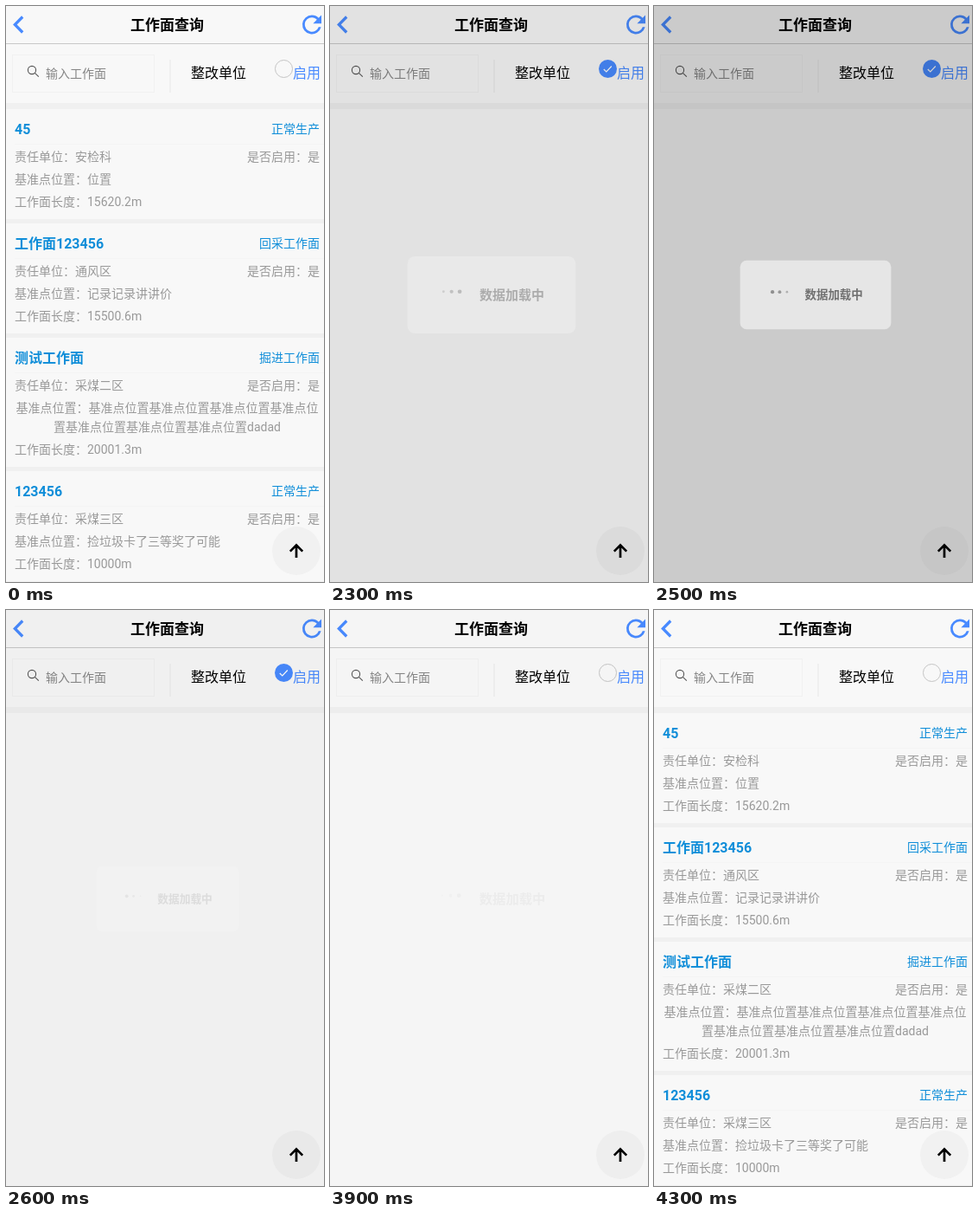
An HTML page for the animation above (6.1 s loop, 368 by 665 pixels).

```html
<!DOCTYPE html>
<html lang="zh-CN">
<head>
<meta charset="utf-8">
<title>工作面查询</title>
<style>
  html, body { margin: 0; width: 100%; height: 100%; overflow: hidden; background: #f8f8f8; }
  svg { display: block; font: 14px Roboto, "Noto Sans CJK SC", "Noto Sans CJK", sans-serif; }
  .line { fill: none; stroke: #488aff; }
  .row { fill: #999; }
  .name { fill: #108ed9; font-size: 16px; font-weight: 700; }
  .state { fill: #108ed9; }
  .end { text-anchor: end; }
  .mid { text-anchor: middle; }
</style>
</head>
<body>
<svg width="368" height="665" viewBox="0 0 368 665">
  <rect width="368" height="665" fill="#f8f8f8"/>
  <rect y="43" width="368" height="1" fill="#c8c8c8"/>
  <path class="line" stroke-width="3.2" d="M19.2 12.5L10.3 21.5L19.2 30.5"/>
  <text class="mid" x="186.5" y="28" font-size="17" font-weight="700">工作面查询</text>
  <path fill="#488aff" transform="translate(337.5 5) scale(1.375)"
    d="M17.65 6.35A7.95 7.95 0 0 0 12 4a8 8 0 1 0 7.73 10h-2.08A6 6 0 1 1 12 6c1.66 0 3.14.69 4.22 1.78L13 11h7V4z"/>

  <rect x="7.5" y="56.5" width="164" height="43" fill="none" stroke="#f1f1f1"/>
  <g fill="none" stroke="#555" stroke-width="1.1">
    <circle cx="30" cy="74" r="4.6"/>
    <path d="M33.4 77.4L37.8 81.6"/>
  </g>
  <text x="46" y="83" fill="#868686">输入工作面</text>
  <rect x="189.5" y="62" width="1" height="38" fill="#e8e8e8"/>
  <text x="214" y="83" font-size="16">整改单位</text>
  <circle id="unchecked" cx="321.5" cy="72.5" r="10" fill="none" stroke="#c4c4c4"/>
  <g id="checked">
    <circle cx="321.5" cy="72.5" r="10.5" fill="#488aff"/>
    <path d="M316.8 73L319.8 76L325.8 69.5" fill="none" stroke="#fff" stroke-width="1.2"/>
  </g>
  <text x="332" y="83" font-size="16" fill="#488aff">启用</text>
  <rect y="112" width="368" height="7" fill="#f0f0f0"/>

  <g id="enabledList"></g>
  <g id="disabledList"></g>

  <circle cx="336" cy="629" r="28" fill="#f1f1f1"/>
  <path d="M336 637V622.8M328.8 629.6L336 622.4L343.2 629.6" fill="none" stroke="#000" stroke-width="2.7"/>

  <rect id="backdrop" width="368" height="665"/>
  <g id="loader">
    <rect x="-91" y="-41.5" width="182" height="83" rx="8" fill="#f8f8f8"/>
    <g id="dots" fill="#444">
      <circle cx="-52" cy="-3.5"/><circle cx="-43.3" cy="-3.5"/><circle cx="-34.5" cy="-3.5"/>
    </g>
    <text x="-13" y="5" font-weight="700" fill="#222">数据加载中</text>
  </g>
</svg>
<script>
const LOOP = 6100, STEP = 100;
// Checkbox toggles, loader starts, new list appears
const LOADS = [
  { toggle: 2100, start: 2240, done: 2700 },
  { toggle: 3900, start: 3892, done: 4300 },
];
const FADE = 200, LEAVE_AFTER = 180;
const $ = id => document.getElementById(id);
const show = (id, on) => $(id).style.display = on ? '' : 'none';
const clamp = v => Math.max(0, Math.min(1, v));

const text = (cls, x, y, s) => `<text class="${cls}" x="${x}" y="${y}">${s}</text>`;

function buildList(id, enabled, cards) {
  let y = 119;
  $(id).innerHTML = cards.map(([name, state, unit, place, length]) => {
    let html = text('name', 10, y + 29, name) + text('state end', 363, y + 28, state)
      + `<rect x="10" y="${y + 40}" width="358" height="1" fill="#f4f4f4"/>`
      + text('row', 10, y + 60, '责任单位：' + unit)
      + text('row end', 363, y + 60, '是否启用：' + enabled);
    const lines = ('基准点位置：' + place).split('\n');
    lines.forEach((line, i) => {
      html += lines.length > 1
        ? text('row mid', 186.5, y + 86 + 22 * i, line)
        : text('row', 10, y + 86, line);
    });
    y += 22 * (lines.length - 1);
    html += text('row', 10, y + 112, '工作面长度：' + length)
      + `<rect y="${y + 127}" width="368" height="5" fill="#f0f0f0"/>`;
    y += 132;
    return html;
  }).join('');
}

const spot = '基准点位置';
buildList('enabledList', '是', [
  ['45', '正常生产', '安检科', '位置', '15620.2m'],
  ['工作面123456', '回采工作面', '通风区', '记录记录讲讲价', '15500.6m'],
  ['测试工作面', '掘进工作面', '采煤二区',
    spot.repeat(3) + '基准点位\n置' + spot.repeat(3) + 'dadad', '20001.3m'],
  ['123456', '正常生产', '采煤三区', '捡垃圾卡了三等奖了可能', '10000m'],
]);
buildList('disabledList', '否', [
  ['测试11', '掘进工作面', '采煤一区', '4242' + '45'.repeat(9) + '4', '5111m'],
  ['111', '掘进工作面', '选煤厂', '', '120m'],
  ['采空区积水', '掘进工作面', '采煤一区', '', '1000m'],
]);

function drawLoader(load, t) {
  show('loader', load);
  show('backdrop', load);
  if (!load) return;
  const age = t - load.start;
  const enter = clamp(age / FADE), leave = clamp((age - LEAVE_AFTER) / FADE);
  const opacity = leave > 0 ? 1 - leave : enter;
  const scale = 1.1 - 0.1 * enter - 0.1 * leave;
  $('backdrop').setAttribute('opacity', 0.3 * opacity);
  $('loader').setAttribute('fill-opacity', opacity);
  $('loader').setAttribute('transform', `translate(187 333.5) scale(${scale})`);
  [...$('dots').children].forEach((dot, i) => {
    const level = 0.5 + 0.5 * Math.cos(2 * Math.PI * ((age - 275) / 750 + 0.147 * i));
    dot.setAttribute('r', 0.8 + 1.4 * level);
    dot.setAttribute('opacity', 0.3 + 0.6 * level);
  });
}

function render(now) {
  const t = Math.floor(now % LOOP / STEP) * STEP;
  const [first, second] = LOADS;
  const checked = t >= first.toggle && t < second.toggle;
  show('checked', checked);
  show('unchecked', !checked);
  show('enabledList', t < first.toggle || t >= second.done);
  show('disabledList', t >= first.done && t < second.toggle);
  drawLoader(LOADS.find(l => t >= l.toggle && t > l.start && t < l.done), t);
}

let origin;
function tick(now) {
  origin ??= now;
  render(now - origin);
  requestAnimationFrame(tick);
}
render(0);
requestAnimationFrame(tick);
</script>
</body>
</html>
```
